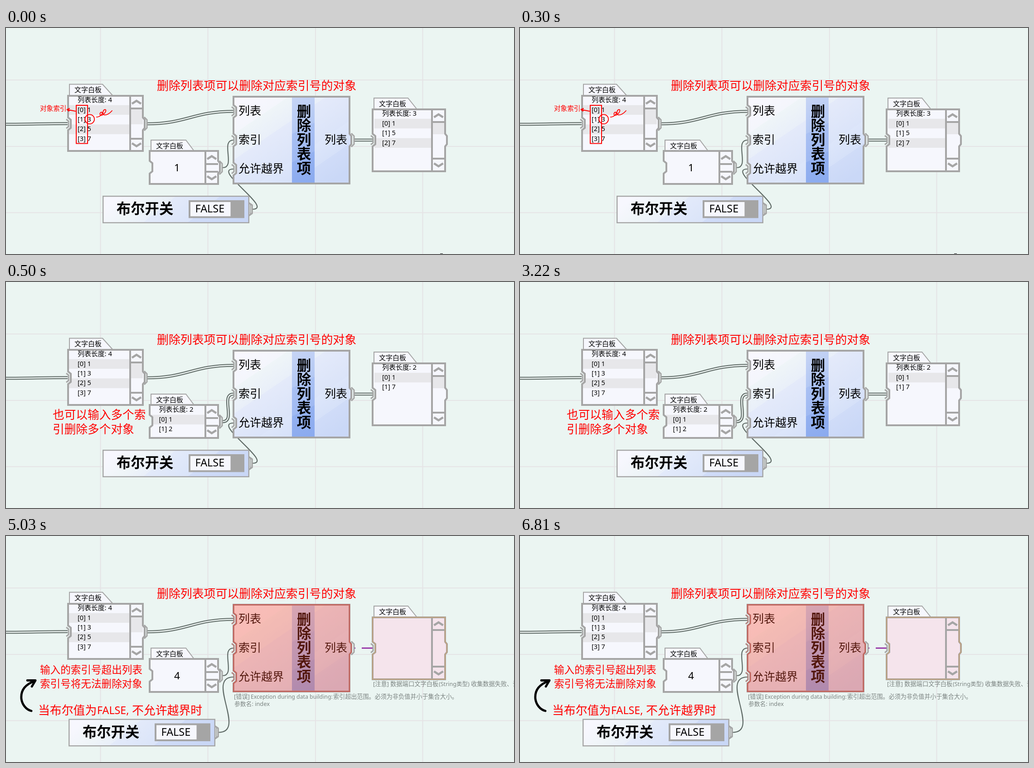
These frames come from a looping animation (1121 px wide and 500 px high, 8000 ms). An HTML page:

```html
<!DOCTYPE html>
<html lang="zh-CN">
<head>
<meta charset="utf-8">
<style>
html, body { margin: 0; width: 100%; height: 100%; overflow: hidden; background: #ebf5f2; }
svg { display: block; width: 1121px; height: 500px; }
text { font-family: "Noto Sans", "Noto Sans CJK SC", "Noto Sans CJK", sans-serif; white-space: pre; }
.line { fill: none; stroke: #a5a5a5; stroke-width: 4; }
.pen { fill: none; stroke-linecap: round; stroke-linejoin: round; }
</style>
</head>
<body>
<svg id="stage" viewBox="0 0 1121 500">
  <defs>
    <linearGradient id="face" gradientUnits="userSpaceOnUse" x1="548" y1="140" x2="696" y2="356">
      <stop offset="0" stop-color="#f8f7fe"/>
      <stop offset=".2" stop-color="#f4f6fc"/>
      <stop offset=".2" stop-color="#eff5f8"/>
      <stop offset=".38" stop-color="#e9eff9"/>
      <stop offset=".38" stop-color="#e4eafa"/>
      <stop offset=".66" stop-color="#dbe4f9"/>
      <stop offset=".66" stop-color="#dde6fa"/>
      <stop offset=".82" stop-color="#d6e1f9"/>
      <stop offset=".82" stop-color="#d0dcf8"/>
      <stop offset="1" stop-color="#cad8f7"/>
    </linearGradient>
    <linearGradient id="band" gradientUnits="userSpaceOnUse" x1="610" y1="155" x2="700" y2="335">
      <stop offset="0" stop-color="#c9d6f5"/>
      <stop offset=".4" stop-color="#b3c8f4"/>
      <stop offset=".4" stop-color="#a9c0f3"/>
      <stop offset=".68" stop-color="#9fb9f2"/>
      <stop offset=".68" stop-color="#94b1f0"/>
      <stop offset="1" stop-color="#8aaaef"/>
    </linearGradient>
    <linearGradient id="bar" gradientUnits="userSpaceOnUse" x1="290" y1="340" x2="420" y2="500">
      <stop offset="0" stop-color="#f7f7fe"/>
      <stop offset=".22" stop-color="#eff5f8"/>
      <stop offset=".38" stop-color="#e9eff9"/>
      <stop offset=".38" stop-color="#e3eafa"/>
      <stop offset=".68" stop-color="#dae4f9"/>
      <stop offset=".68" stop-color="#d0dcf8"/>
      <stop offset="1" stop-color="#c9d7f6"/>
    </linearGradient>
  </defs>
</svg>
<script>
const BG = '#ebf5f2', GRAY = '#a5a5a5', RED = '#ff0000', PALE = '#f6f7fd', WIRE = '#606b67';

const text = (x, y, size, s, fill = '#000', extra = '') =>
  `<text x="${x}" y="${y}" font-size="${size}" fill="${fill}" ${extra}>${s}</text>`;
const rect = (x, y, w, h, fill, extra = '') =>
  `<rect x="${x}" y="${y}" width="${w}" height="${h}" fill="${fill}" ${extra}/>`;
const path = (d, stroke, width, extra = '') =>
  `<path d="${d}" fill="none" stroke="${stroke}" stroke-width="${width}" ${extra}/>`;
const pen = (d, stroke, width) => path(d, stroke, width, 'class="pen"');

const single = d => path(d, WIRE, 2.2);
const double = d => path(d, WIRE, 6.6) + path(d, '#eef5f3', 2.4);

// Outline with notches on the left side and a bump on the right side
function outline(x, y, w, h, notches, bump) {
  const r = x + w;
  let d = `M${x} ${y}H${r}V${bump - 14}l4 5v18l-4 5V${y + h}H${x}`;
  for (const n of [...notches].reverse()) d += `V${n + 14}l6 -5v-18l-6 -5`;
  return d + 'Z';
}
const plugIn = (x, y, color = GRAY) =>
  path(`M${x - 4} ${y - 10}l5 4v12l-5 4`, color, 3);
const plugOut = (x, y) =>
  path(`M${x + 2} ${y - 15}l6 6v18l-6 6`, GRAY, 3);
const chevron = (x, y, dir) =>
  path(`M${x - 10} ${y + 3.5 * dir}L${x} ${y - 3 * dir}L${x + 10} ${y + 3.5 * dir}`, GRAY, 4.5);

function list(x, y, items, left, right) {
  let s = text(x, y, 14.9, '列表长度: ' + items.length);
  items.forEach((v, i) => {
    const base = y + 21.4 * (i + 1) + .4;
    if (i % 2 === 0) s = rect(left, base - 15, right - left, 21.4, '#e7e7ea') + s;
    s += text(x, base, 14.5, `[${i}] ${v}`);
  });
  return s;
}

// Board: body box, tab box, scroll column and inner content
function board(b, content, failed) {
  const { x, y, w, h, tab, split, top, low, port, thumb } = b, r = x + w;
  const d = outline(x, y, w, h, [port], port);
  const mid = (split + r) / 2;
  return `<path d="M${tab[0]} ${y}V${tab[1]}H${tab[2]}L${tab[3]} ${y}" fill="${PALE}" stroke="${GRAY}" stroke-width="2"/>`
    + text(tab[0] + 11, tab[1] + 17.5, 15, '文字白板')
    + `<path d="${d}" fill="${failed ? '#f5e4ec' : PALE}"/>` + content
    + (failed ? '' : rect(split, top, r - split, thumb, '#e7e7ea'))
    + `<path class="line" d="M${split} ${y}V${y + h}M${split} ${top}H${r}M${split} ${low}H${r}"/>`
    + chevron(mid, (y + top) / 2, 1) + chevron(mid, (low + y + h) / 2, -1)
    + `<path class="line" d="${d}"/>`
    + (failed ? path(d, '#cba274', 1.6) : '');
}

const boards = {
  input: { x: 137, y: 150, w: 165, h: 122, tab: [140, 124.5, 213, 236], split: 274, top: 178, low: 245, port: 212, thumb: 35 },
  index: { x: 317, y: 272, w: 151, h: 73, tab: [320, 248, 397, 415], split: 440, top: 301, low: 318, port: 308, thumb: 0 },
  output: { x: 809, y: 180, w: 160, h: 137, tab: [812, 155, 887, 907], split: 940, top: 208, low: 289, port: 248, thumb: 27 }
};

function mainNode(failed) {
  const ports = [184.5, 248, 312];
  const d = outline(502, 152, 256, 192, ports, 248);
  let s = `<path d="${d}" fill="url(#face)"/>` + rect(631, 154, 50, 189, 'url(#band)');
  s += text(513, 192, 25, '列表') + text(513, 255.5, 25, '索引')
    + text(513, 319.5, 25, '允许越界') + text(703, 255.5, 25, '列表');
  [...'删除列表项'].forEach((c, i) => {
    s += text(657.5, 195.5 + 31.6 * i, 31.5, c, '#000', 'font-weight="700" text-anchor="middle"');
  });
  s += `<path class="line" d="${d}"/>`;
  if (failed) {
    s += `<path d="${d}" fill="#fa4628" fill-opacity=".33"/>` + path(d, '#c5655f', 2.4);
  }
  return s + ports.map(p => plugIn(502, p, failed ? '#b08480' : GRAY)).join('') + plugOut(760, 248);
}

const boolNode = (dx, dy) => `<g transform="translate(${dx} ${dy})">`
  + path('M536 387l7 5v18l-7 5', GRAY, 3.5) + path('M539 391v20', GRAY, 2)
  + rect(214.2, 372.2, 321.6, 58.6, 'url(#bar)', `stroke="${GRAY}" stroke-width="2.4"`)
  + text(244, 411, 31.3, '布尔开关', '#000', 'font-weight="700"')
  + rect(405, 383, 119, 35.5, PALE, `stroke="${GRAY}" stroke-width="4"`)
  + rect(495.5, 382, 30, 37, GRAY)
  + text(417.5, 408, 23.4, 'FALSE') + '</g>';

const value = v => text(377.5, 316.5, 22.5, v, '#000', 'text-anchor="middle"');

function scene({ index, result, failed, shift = [0, 0], toggle, notes }) {
  const link = 'M478 309C508 309 472 248 502 248';
  const many = Array.isArray(index);
  return double('M0 213C50 213 85 211.5 136 211.5')
    + double('M310 212C400 212 412 184.5 502 184.5')
    + (many ? double(link) : single(link))
    + single(toggle)
    + (failed ? path('M768 248H771M785 248H809', '#8a1a9c', 2.4) : double('M768 248H810'))
    + board(boards.input, list(158, 163.8, [1, 3, 5, 7], 138, 274))
    + plugIn(137, 212) + plugOut(303, 212)
    + board(boards.index, many ? list(337.5, 287, index, 322, 440) : value(index))
    + plugOut(469, 309)
    + mainNode(failed)
    + board(boards.output, failed ? '' : list(830, 194, result, 813, 940), failed)
    + plugIn(809, 248)
    + boolNode(...shift)
    + text(333, 137, 25.9, '删除列表项可以删除对应索引号的对象', RED)
    + notes;
}

const loose = 'M544 401C592 401 453 312 502 312';

const marks = text(75, 182.5, 14.6, '对象索引', RED)
  + rect(155, 171, 25, 84.5, 'none', `stroke="${RED}" stroke-width="2"`)
  + pen('M153 184L135 180.5M140 178L134.5 180.5L139 184', RED, 2)
  + `<circle cx="184.7" cy="201.8" r="10.4" fill="none" stroke="${RED}" stroke-width="1.8"/>`
  + pen('M200 197C207 197 214 190 212 187C209 184 205 191 209 193C214 194 222 185 220 181C216 178 211 188 216 192C221 194 229 189 234 183', RED, 1.8)
  + path('M958 499.5H964', '#333', 1.4);

const hint = text(103, 303, 25.7, '也可以输入多个索', RED)
  + text(103, 334.5, 25.7, '引删除多个对象', RED);

const tiny = (x, y, size, s) => text(x, y, size, s, '#7c8482', 'font-weight="100"');
const errors = text(75, 303.5, 22.6, '输入的索引号超出列表', RED)
  + text(75, 335, 22.6, '索引号将无法删除对象', RED)
  + text(71, 394.5, 25.85, '当布尔值为', RED)
  + text(201, 394, 23.2, 'FALSE,', RED)
  + text(278, 394.5, 25.85, '不允许越界时', RED)
  + pen('M56 387C44 384 36 373 34 361C32 343 41 329 63 321M47 319.5L65 319.5L57 333', '#000', 4.8)
  + tiny(503, 360, 13.1, '[错误]') + tiny(540, 360, 12.3, 'Exception during data building:')
  + tiny(722, 360, 13.1, '索引超出范围。必须为非负值并小于集合大小。')
  + tiny(504, 376, 12.8, '参数名: index')
  + tiny(810, 332, 13.1, '[注意]') + tiny(848, 332, 13.3, '数据端口文字白板')
  + tiny(955, 332, 12.5, '(String类型)') + tiny(1026, 332, 13.2, '收集数据失败、请检查');

const steps = [
  { at: 0, index: '1', result: [1, 5, 7], toggle: loose, notes: marks },
  { at: 500, index: [1, 2], result: [1, 7], toggle: loose, notes: hint },
  { at: 5030, index: '4', failed: true, shift: [-75, 33.5],
    toggle: 'M469 434.5C532 434.5 439 312 502 312', notes: errors }
];

const stage = document.getElementById('stage');
const grid = [208.5, 445.5, 683, 919.5].map(x => `M${x} 0V500`).join('')
  + [115, 262, 408.5].map(y => `M0 ${y}H1121`).join('');
stage.insertAdjacentHTML('beforeend', rect(0, 0, 1121, 500, BG) + path(grid, '#e5e4e6', 2.2)
  + steps.map(s => `<g class="scene" display="none">${scene(s)}</g>`).join(''));
const groups = stage.querySelectorAll('.scene');

const start = performance.now();
let shown = -1;
function tick() {
  const t = (performance.now() - start) % 8000;
  const now = steps.filter(s => s.at <= t).length - 1;
  if (now !== shown) {
    groups.forEach((g, i) => g.setAttribute('display', i === now ? 'inline' : 'none'));
    shown = now;
  }
  requestAnimationFrame(tick);
}
tick();
</script>
</body>
</html>
```
